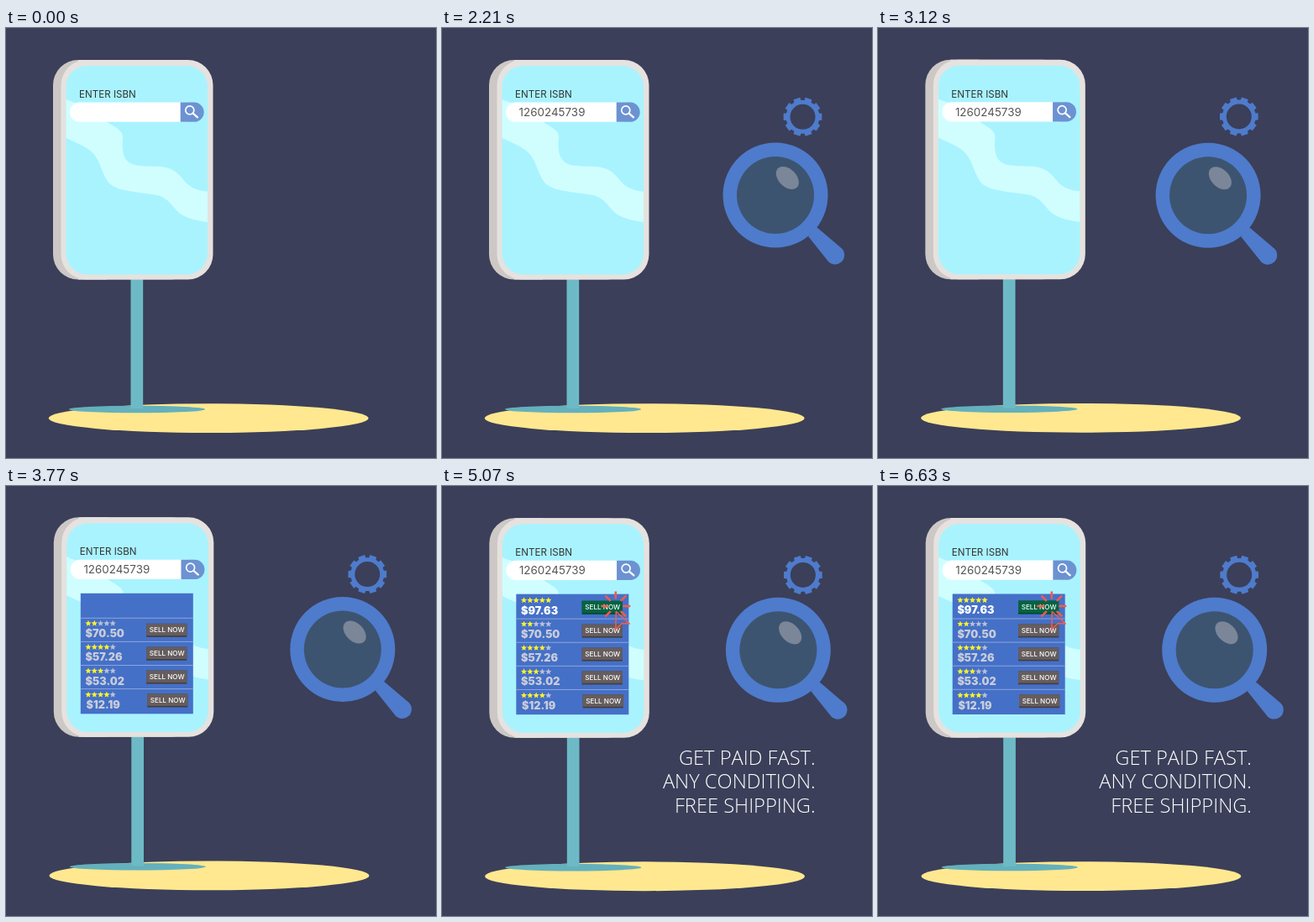
These frames come from a looping animation (512 px wide and 512 px high, 6760 ms). An HTML page:

```html
<!DOCTYPE html>
<html lang="en">
<head>
<meta charset="utf-8">
<style>
html, body { margin: 0; width: 100%; height: 100%; overflow: hidden; background: #3b3f59; }
svg { display: block; width: 100vw; height: 100vh; }
text { font-family: Inter, "Open Sans", sans-serif; }
.tag { font-family: "Open Sans", sans-serif; font-weight: 300; font-size: 23.7px; font-kerning: none; text-anchor: end; fill: #fff; }
.price { font-weight: 900; font-size: 12.7px; }
.sell { font-weight: 500; font-size: 8.1px; fill: #fff; text-anchor: middle; }
</style>
</head>
<body>
<svg viewBox="0 0 512 512">
  <defs>
    <clipPath id="glass"><rect x="71.5" y="45" width="168.5" height="248.5" rx="25"/></clipPath>
  </defs>
  <g id="scene">
    <ellipse cx="241.2" cy="464.6" rx="190.5" ry="17.4" fill="#ffe88f"/>
    <ellipse cx="156" cy="454" rx="81" ry="4.3" fill="#64b0bd"/>
    <rect x="148.5" y="295" width="14.7" height="158" fill="#6dbac6"/>
    <rect x="56" y="38" width="170" height="261.5" rx="30" fill="#cdc8c5"/>
    <rect x="65.5" y="38" width="181" height="261.5" rx="30" fill="#e5e2df"/>
    <path d="M86 38H120V45H86Z M86 292.5H120V299.5H86Z" fill="#e5e2df"/>
    <g clip-path="url(#glass)">
      <rect x="71" y="44" width="170" height="250" fill="#a9f3ff"/>
      <path fill="#d0feff" d="M70 84C86 93 97 88 108 99C114 107 120 112 127 116C135 121 139 124 139 130C138 145 138 159 153 163C171 167 189 161 203 172C214 181 215 193 242 195V231.500C226 229 214 227 205 219C195 209 192 200 174 198C153 195 133 194 123 185C112 171 113 155 99 145C91 139 81 136 70 130Z"/>
    </g>
    <text x="87" y="82.900" font-size="11.600" fill="#333">ENTER ISBN</text>
    <rect x="76" y="88.500" width="150" height="23.300" rx="11.600" fill="#fff"/>
    <path d="M207.700 88.500H224A11.650 11.650 0 0 1 224 111.800H207.700Z" fill="#6c92d2"/>
    <g fill="none" stroke="#fff" stroke-width="1.700" stroke-linecap="round">
      <circle cx="218.800" cy="97.900" r="5"/>
      <path d="M222.700 101.700L228 106.300" stroke-width="2.300"/>
    </g>
    <text id="isbn" x="91.600" y="105.200" font-size="13.400" fill="#555"></text>
    <g id="list"><rect x="88" y="128.500" width="134" height="143.500" fill="#4570c7"/></g>
    <g id="tags"></g>
    <g id="tools" fill="#4e7bcc">
      <path id="gear" fill-rule="evenodd"/>
      <g id="lens">
        <path d="M39 49L49 38L79 63.500A11 11 0 0 1 63 79Z"/>
        <circle r="62.500"/>
        <circle r="46" fill="#3d5470"/>
        <ellipse cx="14.300" cy="-20.500" rx="10.500" ry="16" transform="rotate(-45 14.300 -20.500)" fill="#7b8699"/>
      </g>
    </g>
  </g>
  <g fill="none" stroke="#fa5a48" stroke-linejoin="round">
    <path id="burst" stroke-width="2.500"/>
    <path id="cursor" d="M0 0L16 14.500L7 14L-.5 21Z" stroke-width="1.500"/>
  </g>
</svg>
<script>
const STEP = 130, LOOP = 6760;
const $ = id => document.getElementById(id);
const NS = 'http://www.w3.org/2000/svg';

function add(parent, tag, attrs, text) {
  const el = document.createElementNS(NS, tag);
  for (const k in attrs) el.setAttribute(k, attrs[k]);
  if (text) el.textContent = text;
  parent.appendChild(el);
  return el;
}

const show = (el, on) => el.setAttribute('visibility', on ? 'inherit' : 'hidden');
const move = (el, [x, y]) => el.setAttribute('transform', `translate(${x} ${y})`);
const polar = (r, a, x = 0, y = 0) =>
  `${(x + r * Math.cos(a)).toFixed(2)} ${(y + r * Math.sin(a)).toFixed(2)}`;

function star(cx, cy) {
  const pts = [];
  for (let i = 0; i < 10; i++)
    pts.push(polar(i % 2 ? 1.7 : 3.8, (i * 36 - 90) * Math.PI / 180, cx, cy));
  return pts.join(' ');
}

const offers = [['$97.63', 5], ['$70.50', 2], ['$57.26', 4], ['$53.02', 3], ['$12.19', 4]];
const rows = offers.map(([price, stars], i) => {
  const y = 28.3 * i, best = i === 0, inset = i === 4 ? 1 : 0;
  const g = add($('list'), 'g', {});
  if (i) add($('list'), 'path', { d: `M88 ${129.9 + 28.1 * i}H222`, stroke: '#8ba5df', 'stroke-width': 1 });
  for (let s = 0; s < 5; s++)
    add(g, 'polygon', { points: star(97.2 + 7.3 * s, 136 + y), fill: s < stars ? '#fff32a' : '#b9c1d6' });
  add(g, 'text', { x: 93.7 + inset, y: 152.4 + y, class: 'price', fill: best ? '#fff' : '#c8ccd9' }, price);
  const x = 166.3 + inset, top = 136.6 + 27.9 * i;
  add(g, 'rect', { x, y: top, width: 48.2, height: 16, fill: best ? '#00492f' : '#443e40' });
  add(g, 'rect', { x, y: top, width: 48.2, height: 14.3, fill: best ? '#046342' : '#655d5e' });
  add(g, 'text', { x: x + 24.6, y: top + 10.6, class: 'sell' }, 'SELL NOW');
  return g;
});

const tags = ['GET PAID FAST.', 'ANY CONDITION.', 'FREE SHIPPING.'].map((s, i) =>
  add($('tags'), 'text', { x: 444.3, y: 331.5 + 28.5 * i, class: 'tag' }, s));

function gearPath(teeth) {
  let d = '';
  const w = 2 * Math.PI / teeth;
  for (let i = 0; i < teeth; i++) {
    for (const [r, k] of [[20, -.34], [23.2, -.28], [23.2, .28], [20, .34]])
      d += (d ? 'L' : 'M') + polar(r, (i + k) * w);
  }
  return d + 'ZM15 0A15 15 0 1 0 -15 0A15 15 0 1 0 15 0Z';
}
$('gear').setAttribute('d', gearPath(10));
move($('gear'), [429.5, 105.8]);

let rays = '';
for (let i = 0; i < 8; i++) {
  if (i === 2) continue;
  const a = i * Math.PI / 4;
  rays += `M${polar(8.5, a)}L${polar(17.5, a)}`;
}
$('burst').setAttribute('d', rays);

// Eased position along [time, x, y] keys.
function along(keys, t) {
  if (t <= keys[0][0]) return keys[0].slice(1);
  for (let i = 1; i < keys.length; i++) {
    const [t1, x1, y1] = keys[i], [t0, x0, y0] = keys[i - 1];
    if (t <= t1) {
      const u = (t - t0) / (t1 - t0), e = u * u * (3 - 2 * u);
      return [x0 + (x1 - x0) * e, y0 + (y1 - y0) * e];
    }
  }
  return keys[keys.length - 1].slice(1);
}

const drift = [[2600, 0, 0], [3770, .8, -.7], [4550, 0, 0], [5720, .8, .4], [6630, .7, 0]];
const search = [[2210, 397, 199], [2600, 360, 231], [2860, 372, 212], [3250, 400, 195.2]];
const first = [[1040, 300, 190], [1560, 228, 106], [1690, 219, 105]];
const second = [[4420, 310, 232], [4550, 292, 210], [4940, 207.3, 149.5]];

function draw(ms) {
  const t = Math.floor(ms % LOOP / STEP) * STEP;
  move($('scene'), along(drift, t));
  $('isbn').textContent = '1260245739'.slice(0, t / STEP);

  show($('tools'), t >= 2080);
  move($('lens'), along(search, t));

  show($('list'), t >= 3250);
  rows.forEach((g, i) => show(g, t >= 3900 - i * STEP));
  tags.forEach((el, i) => show(el, t >= 4030 + i * STEP));

  const late = t >= 4420;
  const tip = along(late ? second : first, t);
  show($('cursor'), late || t >= 1040 && t < 2080);
  move($('cursor'), tip);
  show($('burst'), t >= 5070 || t >= 1820 && t < 2080);
  move($('burst'), [tip[0] - .5, tip[1] - 6.5]);
}

const start = performance.now();
function tick(now) {
  draw(Math.max(0, now - start));
  requestAnimationFrame(tick);
}
draw(0);
requestAnimationFrame(tick);
</script>
</body>
</html>
```
